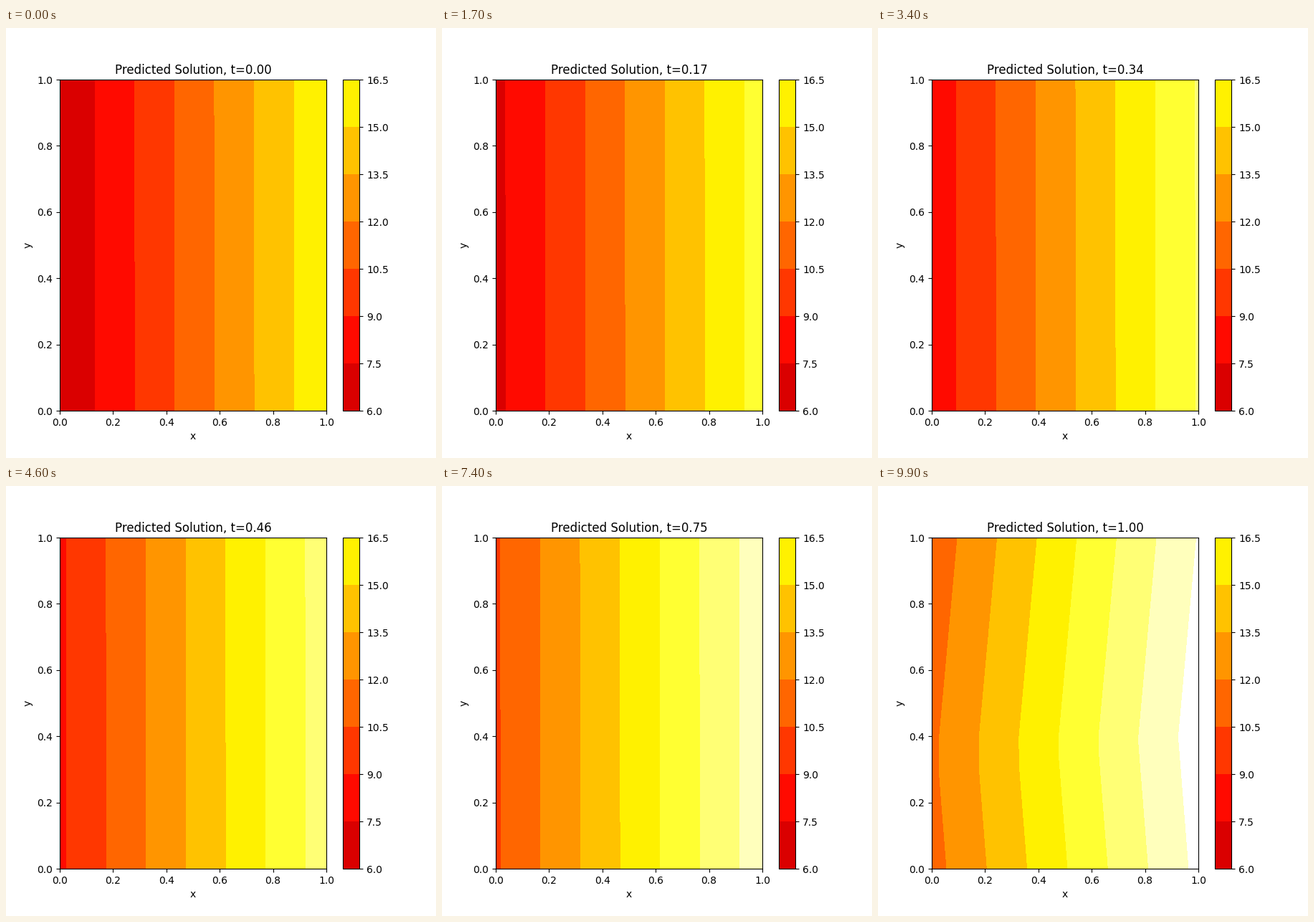
Write a matplotlib script that moves like this. It is 600 px wide and 600 px high and loops after 10000 ms.

```python
import numpy as np
import matplotlib.pyplot as plt
from matplotlib.animation import FuncAnimation

FRAMES = 100
STEP = 1.5
times = np.linspace(0, 1, FRAMES)
X, Y = np.meshgrid(np.linspace(0, 1, 101), np.linspace(0, 1, 101))
style = dict(cmap="hot", vmin=0, vmax=21.74)


def relu(v):
    return np.maximum(v, 0)


def solution(t):
    """Nearly planar field; two hinges bend it as t approaches 1."""
    u = 6.1618 + 10.034 * X + 0.0135 * Y + 5.5426 * t
    u -= 1.15 * relu(Y - 0.4 - 4 * (1 - t))
    u -= 0.96 * relu(0.275 + 0.133 * X - Y - 2.5 * (1 - t))
    return u


def draw(i):
    t = times[i]
    u = solution(t)
    ax.clear()
    low = STEP * np.floor(u.min() / STEP)
    high = STEP * np.ceil(u.max() / STEP)
    levels = np.arange(low, high + STEP / 2, STEP)
    filled = ax.contourf(X, Y, u, levels=levels, **style)
    ax.set_title(f"Predicted Solution, t={t:.2f}")
    ax.set_xlabel("x")
    ax.set_ylabel("y")
    return filled


fig, ax = plt.subplots(figsize=(6, 6), dpi=100)
fig.colorbar(draw(0), ax=ax)

anim = FuncAnimation(fig, draw, frames=FRAMES, interval=100,
                     repeat=True, repeat_delay=0, blit=False)
plt.show()
```
